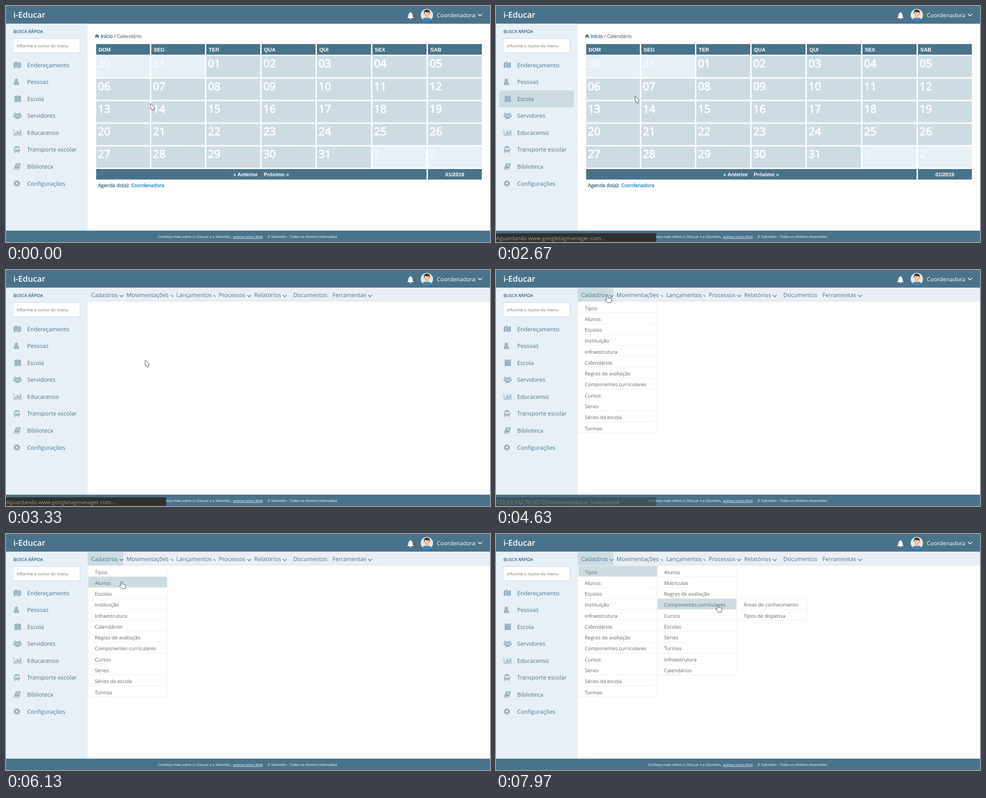
These frames come from a looping animation (1068x524 px, 8000 ms). An HTML page:

```html
<!DOCTYPE html>
<html lang="pt-BR">
<head>
<meta charset="utf-8">
<title>i-Educar</title>
<style>
html, body { margin: 0; width: 100%; height: 100%; overflow: hidden; background: #fefefd; }
svg { display: block; width: 1068px; height: 524px; }
text { font-family: "Open Sans", "Noto Sans", sans-serif; fill: currentColor; text-rendering: geometricPrecision; white-space: pre; }
.bold { stroke: currentColor; stroke-width: .045em; }
.title { font-weight: 600; }
.head { font-family: "Liberation Sans", Arial, sans-serif; font-weight: bold; }
</style>
</head>
<body>
<svg id="stage" viewBox="0 0 1068 524"></svg>
<script>
const BLUE = '#49738a', PALE = '#e7f0f6', CELL = '#cddce3', PAPER = '#fefefd', ICON = '#9ab4c3';
const USER = 'Coordenadora', FIRM = 'Salvirelto';
const ROW = 24.27, TOP = 70.8;

const rect = (x, y, w, h, fill, extra = '') =>
  `<rect x="${x}" y="${y}" width="${w}" height="${h}" fill="${fill}" ${extra}/>`;
const text = (x, y, size, color, str, cls = '') =>
  `<text x="${x}" y="${y}" font-size="${size}" color="${color}" class="${cls}">${str}</text>`;
const circle = (x, y, r, fill) => `<circle cx="${x}" cy="${y}" r="${r}" fill="${fill}"/>`;
const path = (d, fill, extra = '') => `<path d="${d}" fill="${fill}" ${extra}/>`;
const line = (d, color, w) => path(d, 'none', `stroke="${color}" stroke-width="${w}"`);
const group = (id, inner) => `<g id="${id}">${inner}</g>`;

// Sidebar icons, centred on 0,0
const person = (x, y, k) => `<g transform="translate(${x} ${y}) scale(${k})">` + circle(0, -3.6, 3.6, ICON) +
  path('M-5.6 6.8V3.5Q-5.6-.4-2.8-.4Q0 1.6 2.8-.4Q5.6-.4 5.6 3.5V6.8Z', ICON) + '</g>';
const side = [
  ['Endereçamento', path('M-8-5l4.7-2.5v12.5l-4.7 2.5zM-2.6-7.5l5.2 2.5v12.5l-5.2-2.5zM3.3-5l4.7-2.5v12.5l-4.7 2.5z', ICON)],
  ['Pessoas', person(-2.2, 0, 1)],
  ['Escola', rect(-6, -7, 14, 14, ICON)],
  ['Servidores', person(-4.6, -1.5, .7) + person(5.6, -1.5, .7) +
    `<g stroke="${PALE}" stroke-width=".8">${person(.5, .8, .95)}</g>`],
  ['Educacenso', line('M-7.5-7.5V6H10', ICON, 1.3) +
    path('M-5 0h2.5v4.5h-2.5zM-1.3-4.5h2.5v9h-2.5zM2.3-2h2.5v6.5h-2.5zM6-6h2.5v10.5h-2.5z', ICON)],
  ['Transporte escolar', path('M-6-5Q-6-8-1-8Q4-8 4-5L5.5 1V5H4V7.5H1.5V5H-3.5V7.5H-6V5H-7.5V1ZM-4.5-4L-5.3 0H3.3L2.5-4ZM-5 2v1.6h2V2ZM1 2v1.6h2V2Z', ICON, 'fill-rule="evenodd"')],
  ['Biblioteca', path('M-3-7H7.8L4 6.5H-7Q-8.5 6-7.5 4Z', ICON) +
    line('M-1.5-4H4.5M-2.2-1.6H3.8M-6.5 4.3H3', PALE, 1)],
  ['Configurações', `<g transform="translate(-1)">` +
    `<circle r="4" fill="none" stroke="${ICON}" stroke-width="3.6"/>` +
    `<circle r="6" fill="none" stroke="${ICON}" stroke-width="2.6" stroke-dasharray="2.5 2.212"/></g>`]
];

const header = rect(0, 0, 1068, 39.4, BLUE) + text(16.2, 26.2, 18, '#fff', 'i-Educar', 'title') +
  path('M885 27Q888 24.5 888 20Q888.5 15.5 891.5 15V13.5H893.5V15Q896.5 15.5 897 20Q897 24.5 900 27ZM890.5 28h4q-2 4-4 0z', '#fff') +
  '<clipPath id="face"><circle cx="928.7" cy="20" r="13.6"/></clipPath><g clip-path="url(#face)">' +
  rect(915, 6, 28, 28, '#e9e6dc') +
  path('M918.5 35Q918 27 925 26H932.5Q939.5 27 939 35Z', '#2f83c9') +
  rect(926, 21, 5.5, 6.5, '#dfa982') + '<ellipse cx="928.7" cy="18" rx="5.4" ry="7" fill="#f0c19b"/>' +
  path('M922.5 18Q920.5 8.5 928 8Q937 7.5 935 18L933.5 13.5Q928 14.5 924.5 12.5Z', '#3a3331') + '</g>' +
  text(950.7, 24.5, 12.6, '#fff', USER) + line('M1041.5 17.5l4.7 4.7 4.7-4.7', '#fff', 1.5);

const sidebar = rect(0, 39.4, 180, 460, PALE) + text(16.6, 60, 9.45, BLUE, 'BUSCA RÁPIDA', 'bold') +
  rect(15.5, 72.5, 148, 31, '#fff', 'stroke="#cbd9e2"') + text(23.8, 91.7, 9.53, '#757575', 'Informe o nome do menu') +
  rect(7, 187.3, 165, 37.5, CELL, 'id="hover" rx="2"') +
  side.map(([name, icon], i) => {
    const y = 131 + i * 37.57;
    return `<g transform="translate(25 ${y})">${icon}</g>` + text(46.8, y + 4.6, 12.6, BLUE, name);
  }).join('');

const footer = rect(0, 498.8, 1068, 25.2, BLUE) +
  text(335.5, 515.2, 7.82, '#fff', `Conheça mais sobre o i-Educar e a ${FIRM},`) +
  text(501, 515.2, 7.82, '#fff', '<tspan text-decoration="underline">acesse nosso blog</tspan>') +
  text(577, 515.2, 7.88, '#fff', `© ${FIRM} - Todos os direitos reservados`);

function calendar() {
  const left = [199, 320.5, 442, 564, 686, 808.5, 931, 1053];
  const wide = i => left[i + 1] - left[i] - 3;
  let s = path('M196 67L201 62L206 67H204.7V71H202.2V68H199.8V71H197.3V67Z', BLUE) +
    text(208.7, 70.5, 10.8, BLUE, 'Início<tspan fill="#8b8b8b" stroke="#8b8b8b"> / Calendário</tspan>', 'bold');
  ['DOM', 'SEG', 'TER', 'QUA', 'QUI', 'SEX', 'SAB'].forEach((day, i) => {
    s += rect(left[i], 84.5, wide(i), 23.5, BLUE) + text(left[i] + 5.2, 100.7, 11.55, '#fff', day, 'head');
  });
  for (let n = 0; n < 35; n++) {
    const c = n % 7, y = 111 + Math.floor(n / 7) * 50.2, day = n - 1;
    const out = day < 1 || day > 31;
    const label = day < 1 ? day + 31 : day > 31 ? day - 31 : String(day).padStart(2, '0');
    s += rect(left[c], y, wide(c), 47.2, out ? PALE : CELL) +
      text(left[c] + 3.7, y + 25.3, 24, '#fff', label, out ? '' : 'bold');
  }
  return s + rect(199, 362, 729, 23.3, BLUE) + rect(931, 362, 119, 23.3, BLUE) +
    text(501.5, 377.7, 11.55, '#fff', '« Anterior', 'head') + text(568.7, 377.7, 11.55, '#fff', 'Próximo »', 'head') +
    text(969.5, 377.7, 11.55, '#fff', '01/2019', 'head') +
    text(203, 401.7, 10.8, BLUE, 'Agenda do(a):', 'bold') + text(276.5, 401.7, 10.8, '#2b8fc6', USER, 'bold');
}

// label, x, chevron centre, chevron cut in half
const tabs = [['Cadastros', 188, 255], ['Movimentações', 266, 368, 1], ['Lançamentos', 375.7, 462, 1],
  ['Processos', 469.6, 536.5], ['Relatórios', 547.7, 615], ['Documentos', 634], ['Ferramentas', 720.5, 803]];
const bar = rect(180, 39.4, 888, 31.3, '#e9eef5') + rect(180, 39.4, 78.5, 31.3, CELL, 'id="tab"') +
  tabs.map(([name, x, cx, cut]) => text(x, 60.4, 12.6, BLUE, name) +
    (cx ? line(`M${cx - 4} 55.5l4 4${cut ? '' : 'l4-4'}`, BLUE, 1.3) : '')).join('');

const $ = id => document.getElementById(id);
$('stage').innerHTML = rect(0, 0, 1068, 524, PAPER) + header +
  group('page', sidebar + footer) + group('cal', calendar()) + group('bar', bar) + group('menus', '') +
  rect(0, 39.4, 1068, 485, PALE, 'id="blank"') +
  group('status', path('M0 504.5H350.5Q353.5 504.5 353.5 507.5V524H0Z', '#322f2d') +
    '<text id="note" x=".5" y="519.6" font-size="11.8" color="#9c9891"></text>') +
  path('M0 0V13L3.2 12L5 16L8 14.8L7 10.6L9.6 9.6Z', '#fff', 'id="arrow" stroke="#4a4a4a" stroke-linejoin="round"') +
  path('M-1.5 1Q0-.7 1.5 1V6L7 7.2Q9.5 7.8 9.2 10L8 16.5H.5L-4.5 10.5Q-5 8-2.7 9L-1.5 10Z', '#fff', 'id="hand" stroke="#4a4a4a" stroke-linejoin="round"');

const first = ['Tipos', 'Alunos', 'Escolas', 'Instituição', 'Infraestrutura', 'Calendários', 'Regras de avaliação',
  'Componentes curriculares', 'Cursos', 'Séries', 'Séries da escola', 'Turmas'];
const second = ['Alunos', 'Matrículas', 'Regras de avaliação', 'Componentes curriculares', 'Cursos', 'Escolas',
  'Séries', 'Turmas', 'Infraestrutura', 'Calendários'];
const third = {
  0: [128, ['Tipos de benefício']],
  2: [191, ['Fórmulas de cálculo de média', 'Tabelas de arredondamento']],
  3: [156, ['Áreas de conhecimento', 'Tipos de dispensa']]
};

function menu(x, w, items, on = -1, from = 0) {
  const y0 = TOP + from * ROW;
  return rect(x, y0 - .5, w, items.length * ROW, PAPER, 'stroke="#eeeff0"') + items.map((name, i) => {
    const y = y0 + i * ROW;
    return (i === on ? rect(x + .5, y, w - 1, ROW, CELL) : '') +
      line(`M${x} ${y + ROW - .5}h${w}`, '#eeeff0', 1) + text(x + 15, y + 17.8, 11, '#666', name);
  }).join('');
}

function menus(t, x, y) {
  if (t < 4437) return '';
  const row = y < TOP ? -1 : Math.floor((y - TOP) / ROW), deep = x >= 356;
  const on = deep ? 0 : row;
  let s = menu(181, 174.5, first, on);
  if (on === 0) s += menu(356, 175, second, deep ? row : -1);
  if (deep && third[row]) s += menu(531.5, ...third[row], -1, row);
  return s;
}

// Pointer moves: start, end, number of hops, final x, y
const moves = [
  [100, 230, 2, 225, 211], [370, 700, 5, 116, 212], [1170, 1170, 1, 117.5, 213],
  [2100, 2330, 3, 277, 200], [2470, 2470, 1, 293, 200], [2670, 2670, 1, 307, 200],
  [3530, 3800, 5, 302, 192], [3970, 4100, 2, 248, 106], [4270, 4437, 3, 246, 56],
  [5230, 5230, 1, 243, 59], [5370, 5700, 5, 250, 84], [6130, 6130, 1, 255, 105],
  [6230, 6400, 3, 261, 90], [6700, 6930, 3, 339, 79], [7070, 7130, 2, 420, 90],
  [7330, 7830, 7, 473, 147], [7970, 7970, 1, 489.5, 157]
];
function pointer(t) {
  let x = 319, y = 216;
  for (const [a, b, n, tx, ty] of moves) {
    if (t < a) break;
    const hop = n < 2 || t >= b ? n : 1 + Math.floor((t - a) / (b - a) * (n - 1));
    x += (tx - x) * hop / n;
    y += (ty - y) * hop / n;
  }
  return [x, y];
}

const between = (t, a, b) => t >= a && t < b;
const show = (id, on) => $(id).setAttribute('visibility', on ? 'visible' : 'hidden');
// Status bubble opacity, changing in hops of 70 ms
const fade = (t, a, b) => Math.max(0, Math.min(1, (Math.floor((t - a) / 70) + 1) * 70 / (b - a)));
function statusAlpha(t) {
  if (t < 3530) return fade(t, 560, 700);
  if (t < 4560) return 1 - fade(t, 3600, 3800);
  return fade(t, 4630, 4780) * (1 - fade(t, 5660, 5870));
}
const host = '172.23.152.70';
const note = t => t < 1400 ? host + ':32770/intranet/educar_index.php' :
  t < 2470 ? `Aguardando ${host}...` :
  t < 4200 ? 'Aguardando www.googletagmanager.com...' : host + ':32770/intranet/educar_index.php#';

let last = '';
function draw(t) {
  const [x, y] = pointer(t);
  const hand = between(t, 535, 1170) || t >= 4437;
  show('cal', t < 2900);
  show('blank', between(t, 2900, 3030));
  show('hover', between(t, 535, 2900));
  show('bar', t >= 3230);
  show('tab', t >= 4437);
  show('arrow', !hand);
  show('hand', hand);
  $(hand ? 'hand' : 'arrow').setAttribute('transform', `translate(${x} ${y})`);
  $('status').setAttribute('opacity', statusAlpha(t));
  $('note').textContent = note(t);
  const m = menus(t, x, y);
  if (m !== last) $('menus').innerHTML = last = m;
}

const start = performance.now();
function frame(now) {
  draw(Math.max(0, now - start) % 8000);
  requestAnimationFrame(frame);
}
draw(0);
requestAnimationFrame(frame);
</script>
</body>
</html>
```
